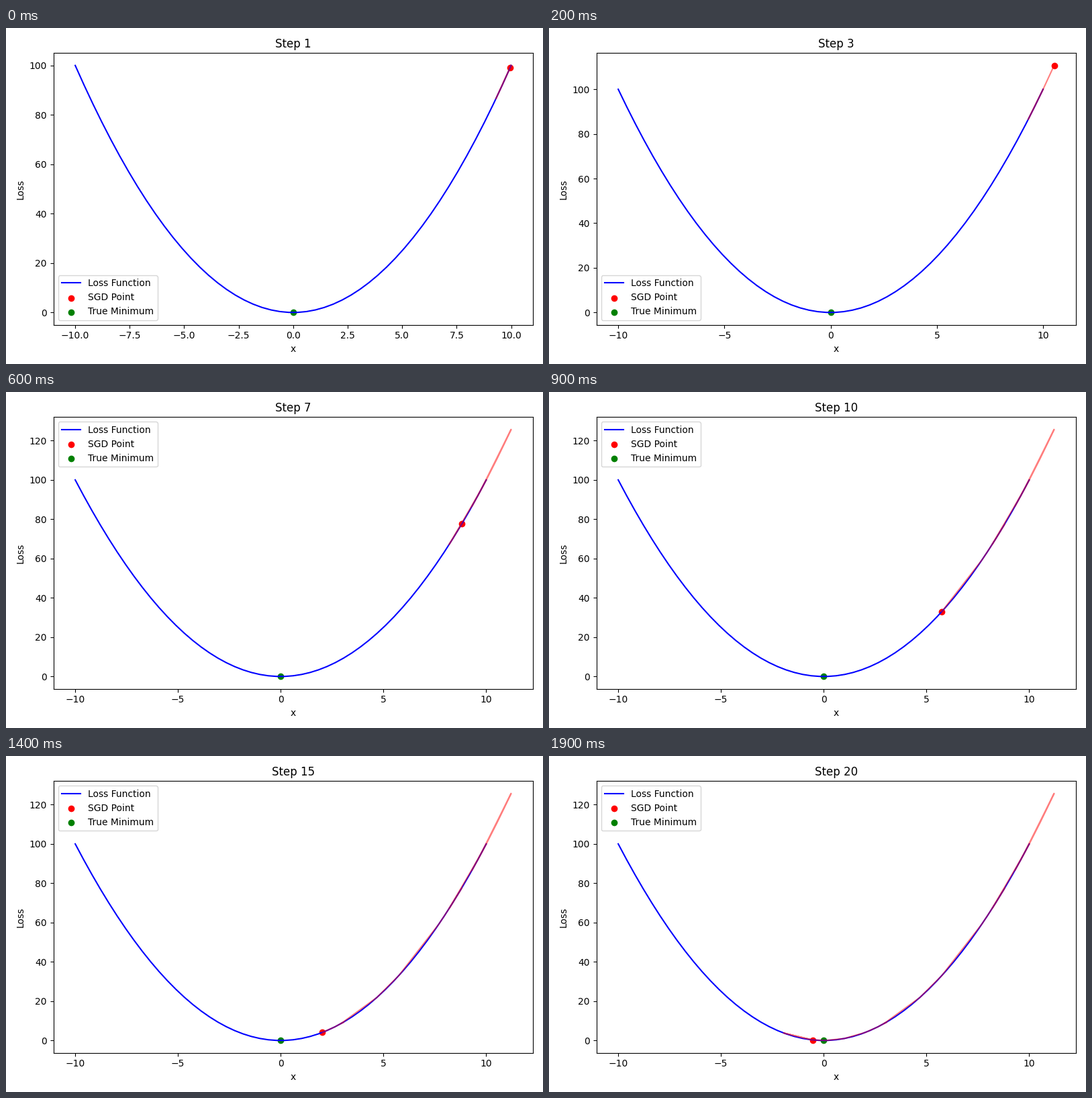
Recreate the animation shown at these times as a matplotlib script. Size 800 by 500 pixels, loop 2 s.

```python
import numpy as np
import matplotlib.pyplot as plt
from matplotlib.animation import FuncAnimation

STEPS = 20
INTERVAL = 100

# Starting positions, then one noisy descent position per step
START = [10.0, 9.3]
WALK = [9.95, 10.0, 10.52, 11.21, 9.7, 8.19, 8.81, 8.25, 7.7, 5.74,
        4.67, 2.93, 3.06, 2.6, 2.02, 1.0, 0.1, -0.6, -1.96, -0.53]


def loss(x):
    return x ** 2


grid = np.linspace(-10, 10, 50)
visited = np.array(START + WALK)

plt.rcParams["font.family"] = "DejaVu Sans"
fig, ax = plt.subplots(figsize=(8, 5), dpi=100)


def draw(step):
    """Redraw the axes with the walk up to the given step."""
    path = visited[:len(START) + step + 1]
    ax.clear()
    ax.plot(grid, loss(grid), color="blue", label="Loss Function")
    ax.scatter(path[-1], loss(path[-1]), color="red", label="SGD Point")
    ax.scatter(0, 0, color="green", label="True Minimum")
    ax.plot(path, loss(path), color="red", alpha=0.5)
    ax.set_title(f"Step {step + 1}")
    ax.set_xlabel("x")
    ax.set_ylabel("Loss")
    ax.legend(loc="best")
    return []


draw(0)
fig.tight_layout()

anim = FuncAnimation(fig, draw, frames=STEPS, init_func=lambda: draw(0),
                     interval=INTERVAL, repeat=True, repeat_delay=0)
plt.show()
```
